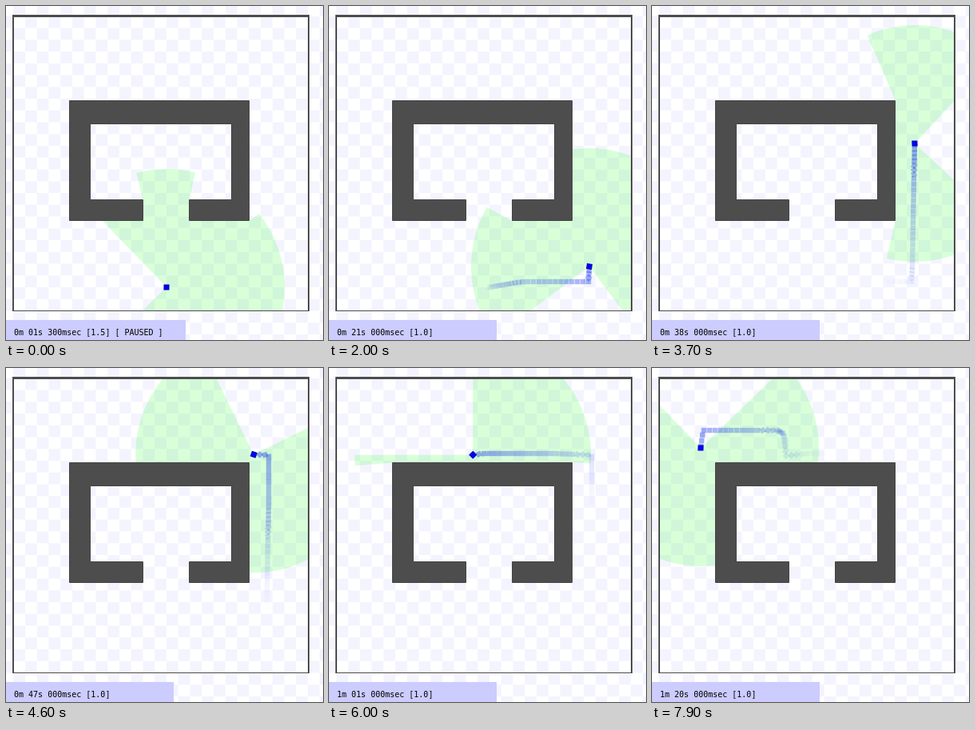
Animation of 397x418 px, one loop 8 s. Source, as an HTML page:

```html
<!DOCTYPE html>
<html>
<head>
<meta charset="utf-8">
<title>Robot wall survey</title>
<style>
html, body { margin: 0; width: 100%; height: 100%; overflow: hidden; background: #fff; }
svg { position: absolute; left: 0; top: 0; display: block; }
text { font: 10px "DejaVu Sans Mono", "Liberation Mono", monospace; white-space: pre; }
</style>
</head>
<body>
<svg width="397" height="418" viewBox="0 0 397 418">
  <defs>
    <pattern id="tiles" width="29.5" height="29.5" x="9.2" y="12.75" patternUnits="userSpaceOnUse">
      <path d="M14.75 0h14.75v14.75h-14.75zM0 14.75h14.75v14.75H0z" fill="#f4f4ff"/>
    </pattern>
  </defs>
  <rect width="397" height="418" fill="#fff"/>
  <rect width="397" height="418" fill="url(#tiles)"/>
  <path id="scan" fill="#0f0" fill-opacity=".15"/>
  <g id="trail"></g>
  <path fill="#4d4d4d" fill-rule="evenodd" d="M8 11H380V382H8zM10 14V381H378V14z"/>
  <path fill="#4d4d4d" stroke="#444"
    d="M79.5 118.5H304.5V268.5H229.5V242.5H282.5V147.5H105.5V242.5H171.5V268.5H79.5z"/>
  <rect id="robot" x="-3" y="-3" width="6" height="6" fill="#00f" stroke="#0000b8"/>
  <rect id="bar" y="393" width="210" height="25" fill="#ccf"/>
  <text id="clock" x="10" y="412" fill="#000"></text>
</svg>
<script>
const RANGE = 148, FOV = 270, RAYS = 720;
const TRAIL_AGE = 23.5, TRAIL_GAP = 0.7;
const STEP = 100, STEPS = 80;
const $ = id => document.getElementById(id);

// corners of the drive: seconds, x, y, heading in degrees (counterclockwise)
const route = [
  [2, 201, 352, -1], [8, 230, 347, 17.5], [10, 244, 345, 0], [18.2, 325, 345, 0],
  [21, 326, 326, 82], [32.3, 328, 215, 90], [38, 329, 172, 182], [45, 329, 109, 180],
  [50, 282, 107, 269], [59.3, 196, 107, 270], [62.3, 168, 110, 315], [65.5, 165, 82, 360],
  [68, 157, 78, 396], [73, 111, 78, 270], [77.8, 64, 78, 270], [80, 61, 100, 269]
];

// x0, y0, x1, y1
const blocks = [
  [79, 118, 305, 148], [79, 118, 106, 269], [282, 118, 305, 269],
  [79, 242, 172, 269], [229, 242, 305, 269]
];
const room = [10, 13, 378, 381];

const clamp = v => Math.min(1, Math.max(0, v));
const mix = (a, b, k) => a + (b - a) * k;

// on each leg the robot turns during the first half
function poseAt(t) {
  const i = Math.max(1, route.findIndex(p => p[0] >= t));
  const [t0, x0, y0, h0] = route[i - 1], [t1, x1, y1, h1] = route[i];
  const k = clamp((t - t0) / (t1 - t0));
  return [mix(x0, x1, k), mix(y0, y1, k), mix(h0, h1, clamp(k * 2))];
}

// entry and exit distances of a ray through a box
function span(x, y, dx, dy, [x0, y0, x1, y1]) {
  const ax = (x0 - x) / dx, bx = (x1 - x) / dx;
  const ay = (y0 - y) / dy, by = (y1 - y) / dy;
  return [
    Math.max(Math.min(ax, bx), Math.min(ay, by)),
    Math.min(Math.max(ax, bx), Math.max(ay, by))
  ];
}

function reach(x, y, dx, dy) {
  let d = Math.min(RANGE, span(x, y, dx, dy, room)[1]);
  for (const box of blocks) {
    const [enter, leave] = span(x, y, dx, dy, box);
    if (enter > 0 && enter < leave) d = Math.min(d, enter);
  }
  return d;
}

function scanPath([x, y, heading]) {
  let d = `M${x} ${y}`;
  for (let i = 0; i <= RAYS; i++) {
    const a = (heading + FOV * (i / RAYS - 0.5) + 1e-4) * Math.PI / 180;
    const dx = Math.cos(a), dy = -Math.sin(a), r = reach(x, y, dx, dy);
    d += `L${(x + dx * r).toFixed(2)} ${(y + dy * r).toFixed(2)}`;
  }
  return d + "z";
}

const place = ([x, y, heading]) => `translate(${x} ${y}) rotate(${-heading})`;

function trailMarks(now) {
  let marks = "";
  const first = Math.ceil(Math.max(2, now - TRAIL_AGE) / TRAIL_GAP);
  for (let n = first; n * TRAIL_GAP < now; n++) {
    const t = n * TRAIL_GAP;
    const alpha = 0.42 * (1 - (now - t) / TRAIL_AGE);
    marks += `<rect x="-3.2" y="-3.2" width="6.4" height="6.4" transform="${place(poseAt(t))}"
      fill="#1030e8" opacity="${alpha.toFixed(3)}"/>`;
  }
  return marks;
}

function draw(step) {
  const paused = step === 0;
  const t = paused ? 1.3 : step + 1;
  const pose = poseAt(t);
  $("scan").setAttribute("d", scanPath(pose));
  $("trail").innerHTML = trailMarks(t);
  $("robot").setAttribute("transform", place(pose));
  $("bar").setAttribute("width", paused ? 225 : 210);
  const sec = String(Math.floor(t) % 60).padStart(2, "0");
  const ms = paused ? "300" : "000";
  const rate = paused ? "[1.5] [ PAUSED ]" : "[1.0]";
  $("clock").textContent = `${Math.floor(t / 60)}m ${sec}s ${ms}msec ${rate}`;
}

const start = performance.now();
let shown = -1;
function tick() {
  const step = Math.floor((performance.now() - start) / STEP) % STEPS;
  if (step !== shown) draw(shown = step);
  requestAnimationFrame(tick);
}
tick();
</script>
</body>
</html>
```
